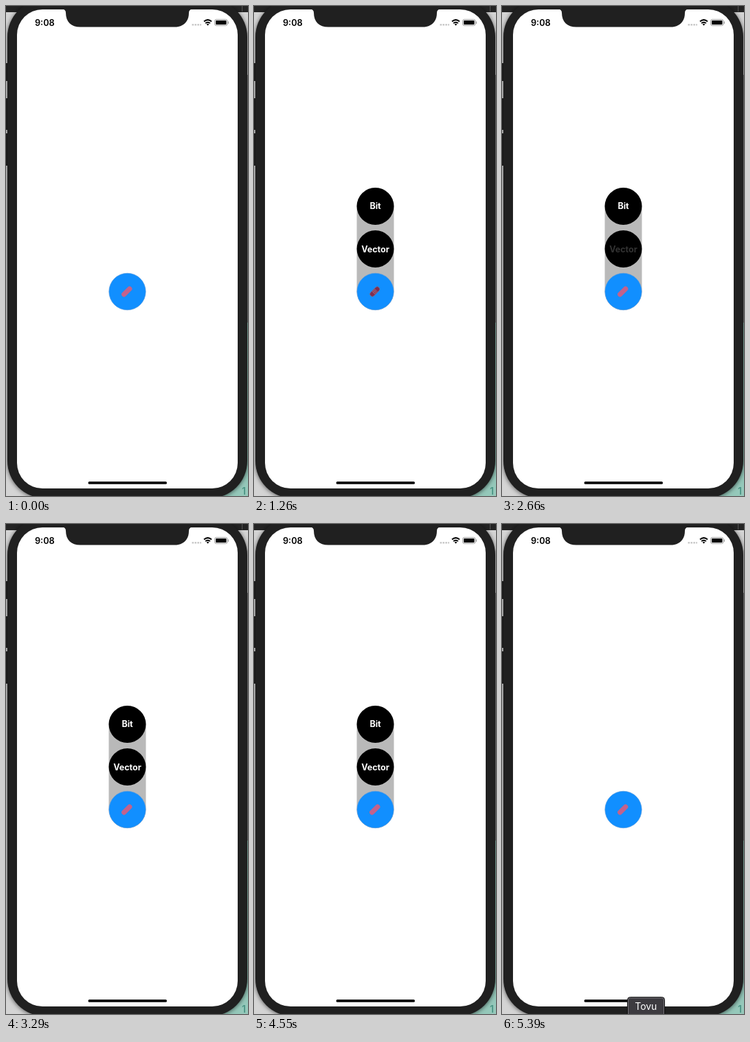
An HTML page that plays this animation: 352 by 712 pixels, repeating every 5.46 s.

```html
<!DOCTYPE html>
<html lang="en">
<head>
<meta charset="utf-8">
<style>
html, body { margin: 0; width: 100%; height: 100%; overflow: hidden; background: #fff; }
svg { display: block; width: 352px; height: 712px; }
text { font-family: Inter, Roboto, sans-serif; }
.label { font-size: 12.5px; font-weight: 700; fill: #fff; text-anchor: middle; }
.bezel { fill: #202020; filter: drop-shadow(0 1px 3px rgba(0, 0, 0, .6)); }
</style>
</head>
<body>
<svg viewBox="0 0 352 712">
  <!-- desktop behind the phone -->
  <rect width="352" height="712" fill="#d4d4d4"/>
  <rect x="176" y="450" width="176" height="262" fill="#95c8ba"/>
  <rect x="340" y="100" width="12" height="360" fill="#858585"/>
  <text x="343" y="710" font-size="14" font-weight="600" fill="#4c9585">1</text>
  <rect width="352" height="9" fill="#242424"/>
  <path d="M343.5 0V8" stroke="#555"/>

  <!-- phone -->
  <path d="M.5 83V109M.5 134V180M.5 185V232" stroke="#222" stroke-width="3"/>
  <rect class="bezel" x="2" y="-9" width="349" height="724" rx="54"/>
  <rect x="16" y="5" width="321" height="696" rx="37" fill="#fff"/>
  <path d="M82 4.5Q87 5 87 10C87 23 95 30.5 108 30.5H245C258 30.5 266 23 266 10Q266 5 271 4.5Z" fill="#202020"/>

  <!-- status bar -->
  <text x="42" y="28.5" font-size="12.7" font-weight="600">9:08</text>
  <path d="M270.5 27.3H284" stroke="#c9c9c9" stroke-width="2.4" stroke-dasharray="2.6 1.3"/>
  <g fill="none" stroke="#000" stroke-width="2">
    <path d="M288 22.4Q293.5 17.8 299 22.4M290.1 25.1Q293.5 22.3 296.9 25.1"/>
    <path d="M291.6 26.4Q293.5 25 295.4 26.4L293.5 28.5Z" fill="#000" stroke="none"/>
  </g>
  <rect x="303.5" y="19.5" width="18.5" height="9" rx="2.5" fill="none" stroke="#a0a0a0"/>
  <rect x="305" y="21" width="15.5" height="6" rx="1"/>
  <path d="M323.3 22.5V25.7" stroke="#a0a0a0" stroke-width="1.3"/>
  <rect x="119.5" y="691" width="114.5" height="3.8" rx="1.9"/>

  <!-- floating menu -->
  <g id="menu">
    <rect x="149.5" y="264" width="54" height="178" rx="27" fill="#b9b9b9"/>
    <circle cx="176.5" cy="291" r="27"/>
    <circle cx="176.5" cy="353" r="27"/>
    <text id="bit" class="label" x="176.5" y="295.3">Bit</text>
    <text id="vector" class="label" x="176.5" y="357.5">Vector</text>
  </g>
  <circle cx="176.5" cy="415" r="26.7" fill="#118fff" stroke="#5b9bdd" stroke-width=".7"/>
  <g transform="translate(175.7 415) rotate(-45)">
    <rect id="idle" x="-9.3" y="-3.6" width="18.6" height="7.2" rx="3.6" fill="#c3628c"/>
    <g id="pressed">
      <rect x="-8.6" y="-3.6" width="17.2" height="7.2" rx="3.4" fill="#802d4f" stroke="#6c82ad" stroke-width=".7"/>
      <rect x="-3" y="-2.9" width="6" height="5.8" fill="#9a5672"/>
      <path d="M-1.5 -1.2H2M-1.5 1.2H2" stroke="#58243f" stroke-dasharray="1 1.5"/>
    </g>
  </g>

  <!-- dock tooltip -->
  <g id="tip">
    <rect x=".5" y=".5" width="54" height="34" rx="4" fill="#3d3b40" stroke="#080808"/>
    <rect x="1.5" y="1.5" width="52" height="32" rx="3" fill="none" stroke="#77757a"/>
    <text x="27.3" y="19" font-size="14" fill="#fff" text-anchor="middle">Tovu</text>
  </g>
</svg>
<script>
const LOOP = 5460, STEP = 70;
const [menu, bit, vector, idle, pressed, tip] =
  ["menu", "bit", "vector", "idle", "pressed", "tip"].map(id => document.getElementById(id));
const show = (el, on) => el.setAttribute("visibility", on ? "visible" : "hidden");
const within = (t, ...spans) => spans.some(([a, b]) => t >= a && t < b);

// A tapped label dims at once, then fades back in.
function tapped(t, start, end) {
  if (t < start || t >= end) return 1;
  const p = Math.max(0, (t - start - STEP) / (end - start - STEP));
  return 0.2 + 0.8 * p * (2 - p);
}

function draw(now) {
  const t = Math.floor(now % LOOP / STEP) * STEP;
  const held = within(t, [70, 210], [1260, 1330], [1890, 2030], [4410, 4550]);
  show(menu, within(t, [420, 1540], [2240, 4760]));
  show(idle, !held);
  show(pressed, held);
  vector.setAttribute("opacity", tapped(t, 2660, 3080));
  bit.setAttribute("opacity", tapped(t, 3500, 3920));

  const slide = Math.min(1, Math.max(0, (t - 5110) / 280));
  const x = t < 4970 ? 173 : 169 + 13 * slide;
  show(tip, t >= 4900);
  tip.setAttribute("transform", `translate(${Math.round(x)} ${Math.round(686 + slide)})`);
}

const start = performance.now();
(function frame() {
  draw(performance.now() - start);
  requestAnimationFrame(frame);
})();
</script>
</body>
</html>
```
